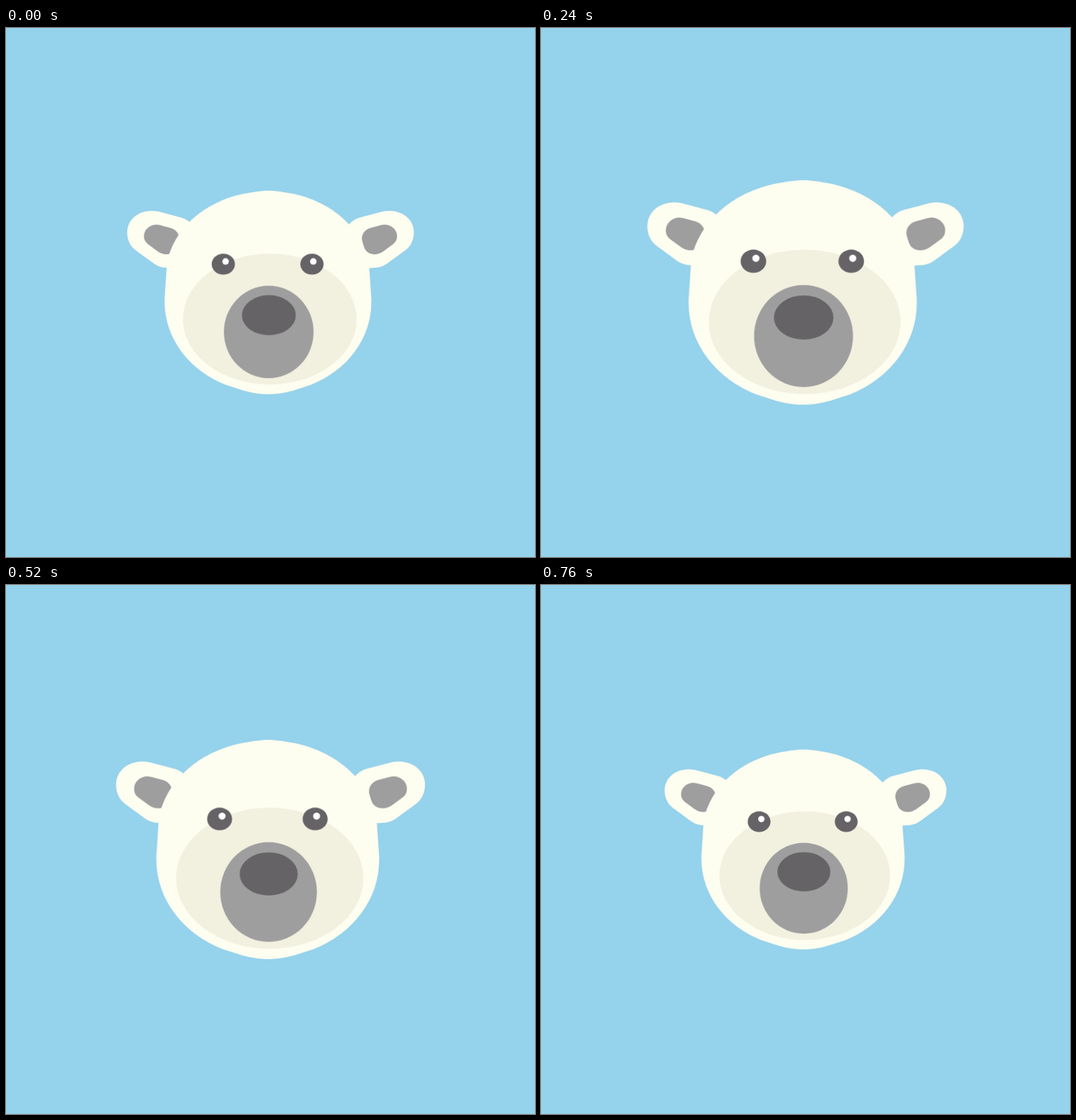
Recreate the animation shown at these times as an HTML page. Size 748 by 748 pixels, loop 0.8 s.

```html
<!DOCTYPE html>
<html lang="en">
<head>
<meta charset="utf-8">
<title>Polar bear</title>
<style>
  html, body { margin: 0; width: 100%; height: 100%; overflow: hidden; background: #95d2eb; }
  svg { display: block; width: 100vw; height: 100vh; }
  .bear { transform-origin: 374px 374px; animation: pulse 800ms linear -49ms infinite; }
  .fur { fill: #fdfdf0; }
  .face { fill: #f2f0df; }
  .grey { fill: #9e9e9e; }
  .dark { fill: #656366; }
  .glint { fill: #fff; }
  @keyframes pulse {
    0%, 100% { transform: scale(.8529); }
    50% { transform: scale(1.0034); }
  }
</style>
</head>
<body>
<svg viewBox="0 0 748 748">
  <defs>
    <g id="ear">
      <path class="fur" d="M141.5 277C141.5 255 160 241.5 181 241.5C187 241.5 192 242.5 197 244L229 252.5C236 254.5 242 258 247 264L270 300L214 334.5L207 334C199 334 192 332 186 328L156 306C146 299 141.5 288 141.5 277Z"/>
      <path class="grey" d="M168.7 283C168.7 272 178 264 189 264C192 264 196 265 199 266L212 269.5C221 272 227 280 225.5 289L222.5 300C220 308 213 312 205 312C201 312 196 310.5 192 308L177 297C171.5 293 168.7 289 168.7 283Z"/>
    </g>
  </defs>
  <g class="bear">
    <use href="#ear"/>
    <use href="#ear" transform="matrix(-1 0 0 1 748 0)"/>
    <path class="fur" d="M370.5 209C357 209 345 211.5 330 214A166 137 0 0 0 206 326L202.2 384V390A168 147 0 0 0 302 524L324 531C340 536.5 356 539 370.5 539C385 539 401 536.5 417 531L439 524A168 147 0 0 0 537.5 390V384L533.5 326A166 137 0 0 0 411 214C396 211.5 384 209 370.5 209Z"/>
    <ellipse class="face" cx="372.8" cy="417.2" rx="140.8" ry="106"/>
    <ellipse class="grey" cx="371.1" cy="438" rx="72.7" ry="75"/>
    <ellipse class="dark" cx="371.3" cy="410.8" rx="43.7" ry="32.5"/>
    <ellipse class="dark" cx="297.4" cy="328" rx="18.8" ry="17"/>
    <ellipse class="dark" cx="441.2" cy="328" rx="18.8" ry="17"/>
    <circle class="glint" cx="301.1" cy="323.7" r="5.3"/>
    <circle class="glint" cx="443.4" cy="323.7" r="5.3"/>
  </g>
</svg>
</body>
</html>
```
